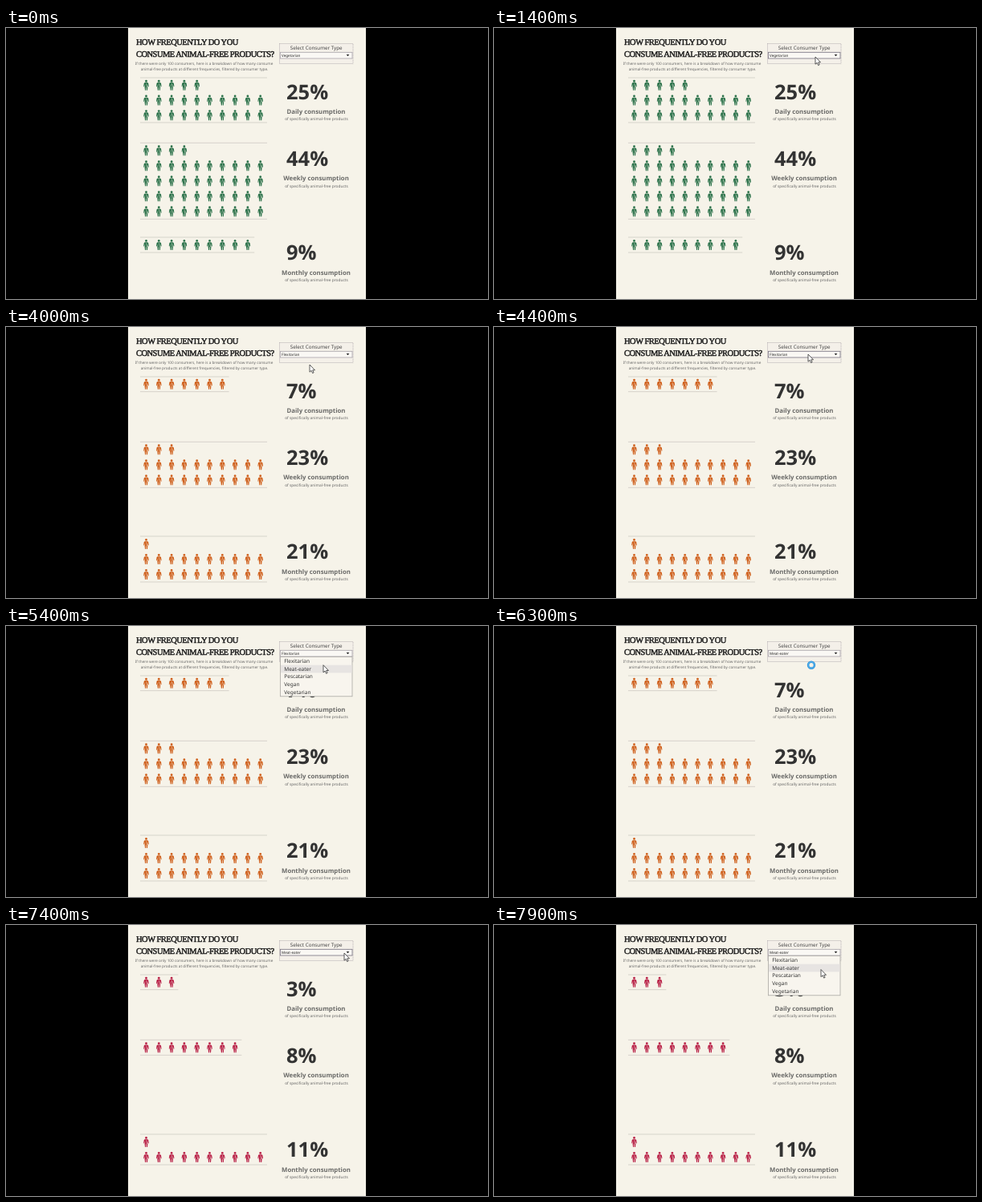
Recreate the animation shown at these times as an HTML page. Size 600 by 338 pixels, loop 8000 ms.

```html
<!DOCTYPE html>
<html lang="en">
<head>
<meta charset="utf-8">
<title>Consumption by consumer type</title>
<style>
  html, body { margin: 0; width: 100%; height: 100%; overflow: hidden; background: #000; }
  svg { display: block; width: 600px; height: 338px; }
  text { font-family: "Noto Sans", "Open Sans", sans-serif; fill: #444; text-rendering: geometricPrecision; }
  .mid { text-anchor: middle; }
  .title { font: 10.5px "Liberation Serif", "Noto Serif", serif; letter-spacing: -.52px; fill: #1c1c1c; stroke: #1c1c1c; stroke-width: .45; }
  .intro { font-size: 4.7px; fill: #666; }
  .head { font-size: 6.25px; }
  .value { font-size: 4.6px; fill: #222; }
  .item { font-size: 6.5px; fill: #333; }
  .percent { font-size: 25.5px; font-weight: 700; fill: #333; }
  .label { font-size: 7.8px; font-weight: 700; fill: #6a6a68; }
  .note { font-size: 4.82px; fill: #666; }
  .rule { stroke: #d3d0c8; stroke-width: .9; }
</style>
</head>
<body>
<svg viewBox="0 0 600 338">
  <defs>
    <g id="person">
      <circle cy="-5.1" r="1.4"/>
      <path d="M-1.6-3.3H1.6Q2.6-3.1 2.8-2L3.3 1.6 2.6 1.9 1.7-1.2 1.9 2.4 1.5 6.5H.5L.3 2.6H-.2L-.4 6.5H-1.4L-1.9 2.4-1.7-1.2-2.6 1.9-3.3 1.6-2.8-2Q-2.6-3.1-1.6-3.3Z"/>
      <path d="M.2-2.2L.9 2.6" stroke="#f6f3e9" stroke-width=".7" opacity=".75"/>
    </g>
  </defs>
  <rect width="600" height="338"/>
  <rect x="152" width="296" height="338" fill="#f6f3e9"/>
  <text class="title" x="162" y="21.1">HOW FREQUENTLY DO YOU</text>
  <text class="title" x="162" y="36">CONSUME ANIMAL-FREE PRODUCTS?</text>
  <text class="intro mid" x="246.5" y="45.6">If there were only 100 consumers, here is a breakdown of how many consume</text>
  <text class="intro mid" x="247" y="52.6">animal-free products at different frequencies, filtered by consumer type.</text>
  <g id="chart"></g>
  <rect x="340.5" y="19.5" width="91.5" height="25" fill="#f4f0e9" stroke="#a59ca2" stroke-width=".8" stroke-dasharray="1 1"/>
  <text class="head mid" x="386.2" y="27.4">Select Consumer Type</text>
  <rect id="box" x="341.5" y="30.3" width="89.5" height="7.7" fill="#faf8f4" stroke-width=".8"/>
  <text id="value" class="value" x="343" y="35.8"></text>
  <path d="M423.7 33h3.6l-1.8 2.2z" fill="#222"/>
  <g id="menu">
    <rect x="341.5" y="38.4" width="89.5" height="49.4" fill="#f8f5ee" stroke="#aaa8a4" stroke-width=".8"/>
    <rect id="hover" x="342" width="88.5" height="9.8" fill="#e7e4e2"/>
  </g>
  <path id="arrow" d="M0 0V9.2L2.1 7.3 3.6 10.6 5.1 9.9 3.7 6.8H6.5Z" fill="#fff" stroke="#333" stroke-width=".8"/>
  <g id="busy" fill="none">
    <circle r="3.9" stroke="#2b93dc" stroke-width="2.6"/>
    <circle r="3.9" stroke="#69bdf2" stroke-width=".8"/>
  </g>
</svg>
<script>
const $ = id => document.getElementById(id);
const LOOP = 8000, STEP = 100;
const types = ["Flexitarian", "Meat-eater", "Pescatarian", "Vegan", "Vegetarian"];

// Top rule, row pitch and text baselines of each block
const blocks = [
  { name: "Daily", top: 62, pitch: 18.65, number: 89, label: 107.2, note: 115.2 },
  { name: "Weekly", top: 143.3, pitch: 19, number: 171.5, label: 190.4, note: 198.6 },
  { name: "Monthly", top: 261, pitch: 19, number: 288.6, label: 307.7, note: 315.8 }
];
const data = [
  { from: 0, color: "#2a7149", counts: [25, 44, 9] },
  { from: 4000, color: "#cf5f1b", counts: [7, 23, 21] },
  { from: 6500, color: "#b92147", counts: [3, 8, 11] }
];
const choices = [[0, 4], [3000, 0], [5900, 1]];
const menuOpen = [[1700, 3000], [5100, 5900], [7500, 8000]];
const waiting = [[3000, 4000], [5900, 6500]];

// Pointer tip: time, x, y
const path = [
  [1100, 405, 22], [1400, 400, 36], [1700, 400, 36], [2400, 376, 43.5], [3000, 376, 43.5],
  [4000, 378, 47], [4400, 391, 34], [5000, 391, 34], [5400, 395, 48.7], [6600, 395, 48.7],
  [7200, 421, 35], [7500, 421, 35], [7900, 407, 55.5]
];

const within = (spans, t) => spans.some(([a, b]) => t >= a && t < b);
const show = (el, on) => el.style.display = on ? "" : "none";

function pointer(t) {
  const i = path.findIndex(p => p[0] > t);
  if (i < 0) return path.at(-1).slice(1);
  const [a, b] = [path[Math.max(i - 1, 0)], path[i]];
  const u = Math.max(0, (t - a[0]) / (b[0] - a[0]));
  const k = u * u * (3 - 2 * u);
  return [a[1] + (b[1] - a[1]) * k, a[2] + (b[2] - a[2]) * k];
}

function blockMarkup(b, count, color) {
  const rows = Math.ceil(count / 10), first = count % 10 || 10;
  const right = 167 + 15.8 * Math.min(count, 10);
  let out = "";
  for (const y of [b.top, b.top + rows * b.pitch])
    out += `<path class="rule" d="M167 ${y}H${right}"/>`;
  for (let r = 0; r < rows; r++)
    for (let c = 0; c < (r ? 10 : first); c++)
      out += `<use href="#person" fill="${color}" x="${174.5 + 15.8 * c}" y="${b.top + b.pitch * (r + .5)}"/>`;
  return out + `<text class="percent" x="349" y="${b.number}">${count}%</text>
    <text class="label mid" x="386" y="${b.label}">${b.name} consumption</text>
    <text class="note mid" x="386.5" y="${b.note}">of specifically animal-free products</text>`;
}

$("menu").innerHTML += types.map((s, i) =>
  `<text class="item" x="346.3" y="${45.7 + 9.85 * i}">${s}</text>`).join("");

let current;
function draw(t) {
  const set = data.findLast(d => t >= d.from);
  if (set !== current) {
    current = set;
    $("chart").innerHTML = blocks.map((b, i) => blockMarkup(b, set.counts[i], set.color)).join("");
  }
  const [x, y] = pointer(t);
  const open = within(menuOpen, t), busy = within(waiting, t), visible = t >= path[0][0];
  const chosen = choices.findLast(c => t >= c[0])[1];
  const over = visible && !open && !busy && y > 30 && y < 38;
  const row = y > 38.3 ? Math.floor((y - 38.3) / 9.85) : chosen;

  $("value").textContent = types[chosen];
  $("box").setAttribute("stroke", over ? "#777180" : "#a9a3aa");
  $("hover").setAttribute("y", 38.8 + 9.85 * row);
  show($("menu"), open);
  show($("arrow"), visible && !busy);
  show($("busy"), busy);
  for (const id of ["arrow", "busy"]) $(id).setAttribute("transform", `translate(${x} ${y})`);
}

const start = performance.now();
function tick() {
  const t = (performance.now() - start) % LOOP;
  draw(Math.floor(t / STEP) * STEP);
  requestAnimationFrame(tick);
}
tick();
</script>
</body>
</html>
```
